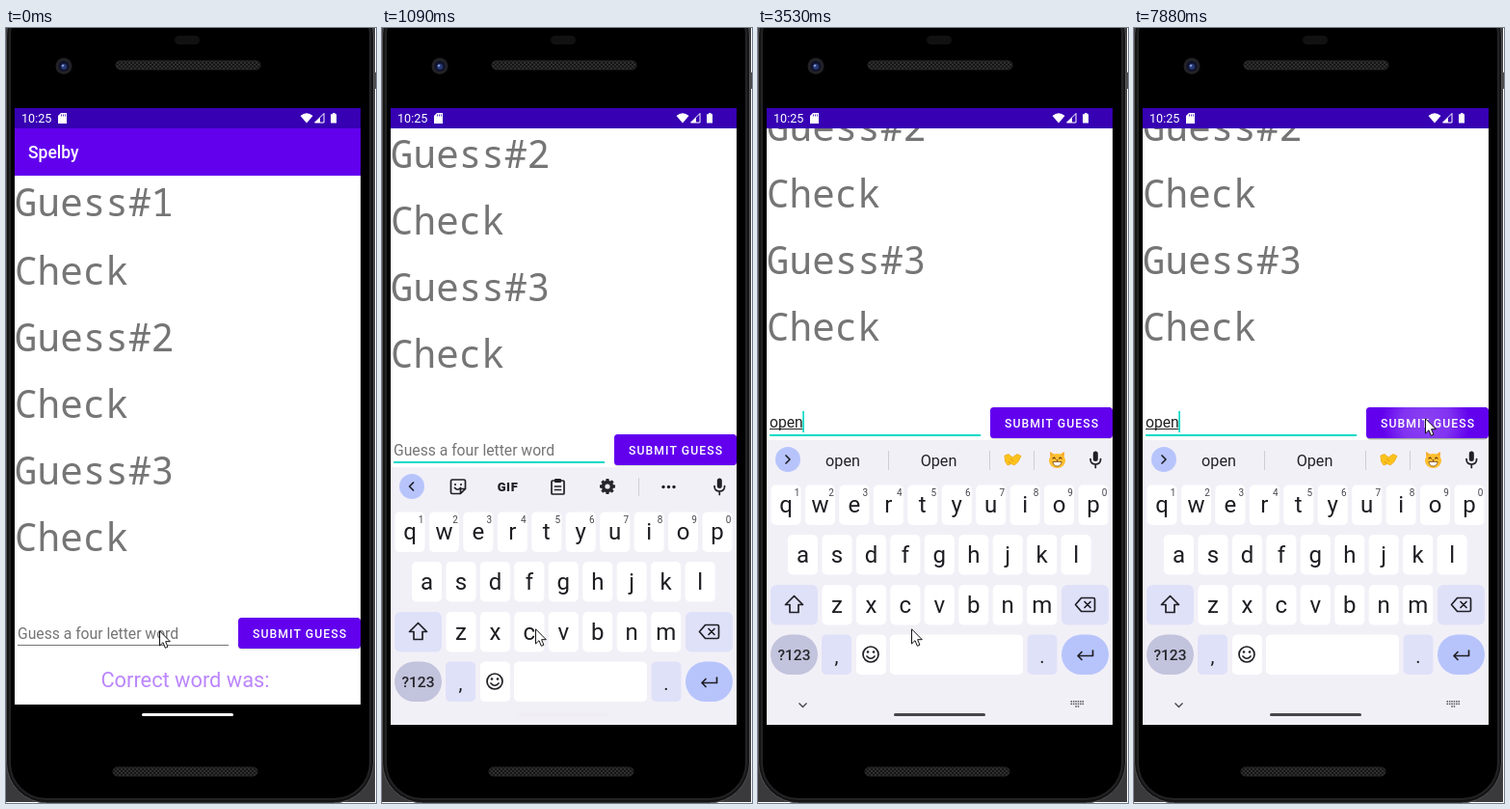
Write an HTML page that moves like this. It is 384 px wide and 803 px high and loops after 8 s.

```html
<!DOCTYPE html>
<html lang="en">
<head>
<meta charset="utf-8">
<title>Word game</title>
<style>
html, body { margin: 0; width: 100%; height: 100%; overflow: hidden; background: #fff; }
svg { display: block; width: 384px; height: 803px; font-family: Roboto, "Open Sans", sans-serif; }
text { white-space: pre; }
.mono { font: 39.3px "Noto Sans Mono", "DejaVu Sans Mono", monospace; fill: #757575; }
.line { fill: none; stroke: #1f1f25; stroke-width: 1.7; stroke-linecap: round; stroke-linejoin: round; }
.key { font-size: 24px; fill: #1d1d22; text-anchor: middle; }
.digit { font-size: 10px; fill: #45454d; text-anchor: middle; }
.word { font-size: 16.2px; fill: #222228; text-anchor: middle; }
</style>
</head>
<body>
<svg id="stage" viewBox="0 0 384 803" xmlns="http://www.w3.org/2000/svg"></svg>
<script>
const LOOP = 8000;

const rect = (x, y, w, h, fill, r = 0, more = '') =>
  `<rect x="${x}" y="${y}" width="${w}" height="${h}" rx="${r}" fill="${fill}" ${more}/>`;
const circle = (x, y, r, fill, more = '') => `<circle cx="${x}" cy="${y}" r="${r}" fill="${fill}" ${more}/>`;
const text = (x, y, s, more = '') => `<text x="${x}" y="${y}" ${more}>${s}</text>`;
const path = (d, more = 'class="line"') => `<path d="${d}" ${more}/>`;
const group = (id, body, more = '') => `<g id="${id}" ${more}>${body}</g>`;

function phone() {
  const grille = (x, y) => rect(x, y, 150, 9, '#151515', 4.5) + rect(x, y, 150, 9, 'url(#mesh)', 4.5, 'stroke="#262626" stroke-width="1"');
  return rect(0, 0, 383, 802, '#3a3a3c')
    + rect(379, 46, 5, 17, '#4a4a4c')
    + rect(0.5, -34, 381, 837, '#141415', 42, 'stroke="#505053" stroke-width="1"')
    + rect(4, -30, 374, 829, '#000', 38, 'stroke="#232325" stroke-width="2"')
    + rect(175, 8, 26, 9, '#111112', 4.5)
    + circle(60, 39.5, 8.5, '#222227') + circle(60, 39.5, 5.5, '#10142c')
    + circle(60, 40, 3, '#293b78') + circle(59, 39, 1.2, '#8798d4')
    + grille(114, 34) + grille(111, 766);
}

function statusBar() {
  return rect(9, 83, 359, 21, '#3700b3')
    + text(16, 98, '10:25', 'font-size="12.6" fill="#fff"')
    + path('M57 88h6v11h-9v-8z', 'fill="#fff"')
    + path('M57.500 89.500v2M59.500 89.500v2M61.500 89.500v2', 'stroke="#3700b3" stroke-width=".8"')
    + path('M305.500 91Q312 85.500 318.500 91L312 98.500z', 'fill="#fff"')
    + path('M320.500 98L330 88.500V98z', 'fill="none" stroke="#fff"')
    + path('M320.500 98L326 92.500V98z', 'fill="#fff"')
    + path('M339 88h2.500v1.200h1.500v9.300h-6v-9.300h2z', 'fill="#fff"');
}

function content() {
  const rows = [195, 266, 335, 404, 473, 542].map((y, i) =>
    text(9, y, i % 2 ? 'Check' : 'Guess#' + (i / 2 + 1), 'class="mono"')).join('');
  return rect(9, 104, 359, 597, '#fff')
    + rect(9, 104, 359, 49, '#6200ee')
    + text(23, 135, 'Spelby', 'font-size="17.5" font-weight="500" fill="#fff"')
    + rows
    + text(12, 632.5, 'Guess a four letter word', 'id="hint" font-size="15.700" fill="#757575"')
    + text(12, 632, '', 'id="typed" font-size="15.700" fill="#212121"')
    + rect(12, 633, 0, 1, '#212121', 0, 'id="composing"')
    + rect(12, 639, 219, 1, '#757575', 0, 'id="fieldLine"')
    + rect(12, 615, 1.7, 22, '#03dac5', 0, 'id="caret"')
    + rect(241.500, 612.500, 126, 32, '#000', 4, 'id="shade" opacity=".12"')
    + rect(241, 611, 127, 32, '#6200ee', 3.5)
    + rect(241, 611, 127, 32, 'url(#ripple)', 3.5, 'id="press"')
    + text(256, 631.5, 'SUBMIT GUESS', 'font-size="12.230" font-weight="500" letter-spacing="1.090" fill="#fff"')
    + text(186, 683, 'Correct word was:', 'font-size="21.8" text-anchor="middle" fill="#bb86fc"');
}

function icons() {
  let teeth = '';
  for (let a = 0; a < 360; a += 45) teeth += rect(232.3, 439, 3.4, 4, '#26262c', 0.8, `transform="rotate(${a} 234 447)"`);
  return path('M32.500 443L28.500 447L32.500 451')
    + path('M73 440h12q1.500 0 1.500 1.500v8l-5 5H73q-1.500 0-1.500-1.500v-11.500q0-1.500 1.500-1.500zM81.500 454v-4.500h5M75.500 448.500q3 3.500 6 0')
    + circle(76, 445, 1.1, '#1f1f25') + circle(82, 445, 1.1, '#1f1f25')
    + text(130.5, 452, 'GIF', 'font-size="13" font-weight="900" text-anchor="middle" fill="#1f1f25" letter-spacing=".6"')
    + path('M177 441h11q1 0 1 1v12q0 1-1 1h-11q-1 0-1-1v-12q0-1 1-1zM179.500 447h6M179.500 450.500h6')
    + rect(179, 439, 7, 4, '#1f1f25', 1)
    + teeth + circle(234, 447, 4.4, 'none', 'stroke="#26262c" stroke-width="3.600"')
    + rect(266, 438, 1, 19, '#d0ced6')
    + [292, 297.5, 303].map(x => circle(x, 447.5, 1.7, '#1f1f25')).join('');
}

function suggestions() {
  const ink = 'fill="none" stroke="#6a3b12" stroke-width="1.200" stroke-linecap="round"';
  const hands = path('M256 443l4-1.500 4 3.500 5-3.500 4 2-3 6-4 3.500-3-1.500-4 1.500-2.500-4z', 'fill="#fcc21b" stroke="#eeac16" stroke-width=".8"')
    + path('M262 446l3 3M260 449l2 2', 'stroke="#e09a12"');
  const cat = path('M303.500 447l-.5-8 5.500 3.500zM317.500 447l.5-8-5.500 3.500z', 'fill="#f9a825"')
    + `<ellipse cx="310.500" cy="448.500" rx="8.500" ry="7.500" fill="#fdbf2d"/>`
    + path('M306 449.500h9q-.5 4.500-4.500 4.500t-4.500-4.500z', 'fill="#fff" stroke="#7a4a1c" stroke-width=".8"')
    + path('M306 446q1.200-1.800 2.400 0M312.600 446q1.200-1.800 2.400 0', ink)
    + circle(310.500, 448, 0.9, '#8a4b38');
  return path('M29 443L33 447L29 451')
    + rect(135, 438, 1, 20, '#cfcdd5') + rect(240, 438, 1, 20, '#cfcdd5')
    + [88, 187.5, 287].map((x, i) => text(x, 454, '', `class="word" id="word${i}"`)).join('')
    + group('emoji', rect(286, 438, 1, 20, '#cfcdd5') + hands + cat);
}

function keyboard() {
  const row = (keys, x0, y) => [...keys].map((k, i) => {
    const x = x0 + i * 35.45;
    return rect(x - 15.5, y, 31, 41.5, '#fff', 5) + text(x, y + 28.5, k, 'class="key"')
      + (keys.length > 9 ? text(x + 11.5, y + 11, (i + 1) % 10, 'class="digit"') : '');
  }).join('');
  const dots = [0, 1, 2].map(j => [0, 1, 2, 3, 4, 5].map(i =>
    j === 2 && (i < 2 || i > 3) ? '' : rect(324.500 + i * 2.4, 697 + j * 2.6, 1.5, 1.5, '#55555d')).join('')).join('');
  return rect(9, 427, 359, 310, '#f2f0f7')
    + circle(31, 447, 13, '#b7c4fc')
    + group('icons', icons()) + group('strip', suggestions())
    + rect(347.8, 438.500, 5, 10.500, '#1f1f25', 2.5)
    + path('M345 446.500q0 5.500 5.300 5.500t5.300-5.500M350.300 452v3.500')
    + row('qwertyuiop', 29, 473.5) + row('asdfghjkl', 46.5, 525) + row('zxcvbnm', 82, 577)
    + rect(13, 577, 49, 41.5, '#dfe1f8', 6) + rect(315, 577, 49, 41.5, '#dfe1f8', 6)
    + path('M37.500 588.500l9 9h-4.500v8h-9v-8h-4.500z')
    + path('M335.500 590.500h12.500q1.500 0 1.500 1.500v11q0 1.500-1.500 1.500H335.500l-6-7zM339 594.500l6 6M345 594.500l-6 6')
    + rect(13, 628.5, 49, 41.5, '#c2c3dc', 20.7)
    + text(37.5, 655, '?123', 'font-size="15.500" font-weight="500" text-anchor="middle" fill="#25252c"')
    + rect(66, 628.5, 31, 41.5, '#dfe1f8', 5) + text(81.5, 658, ',', 'class="key" style="font-size:20px"')
    + rect(102, 628.5, 31, 41.5, '#fff', 5) + circle(117, 649, 8, 'none', 'stroke="#1f1f25" stroke-width="1.700"')
    + circle(114, 646.5, 1.3, '#1f1f25') + circle(120, 646.5, 1.3, '#1f1f25') + path('M113 651q4 4.500 8 0')
    + rect(137, 628.5, 138, 41.5, '#fff', 5)
    + rect(279.5, 628.5, 31, 41.5, '#dfe1f8', 5) + text(295, 658, '.', 'class="key" style="font-size:20px"')
    + rect(315, 628.5, 49, 41.5, '#b7c4fc', 20.7)
    + path('M347.500 645v5.500h-15M336 646.500l-4 4 4 4')
    + path('M42.500 699.500l4 4 4-4', 'fill="none" stroke="#44444c" stroke-width="1.300"') + dots;
}

const defs = `<defs>
  <pattern id="mesh" width="4" height="4" patternUnits="userSpaceOnUse"><path d="M0 0L4 4M4 0L0 4" stroke="#363636" stroke-width=".8"/></pattern>
  <radialGradient id="ripple" gradientUnits="userSpaceOnUse" cx="303" cy="626" r="46">
    <stop offset="0" stop-color="#fff" stop-opacity=".26"/><stop offset=".55" stop-color="#fff" stop-opacity=".2"/>
    <stop offset="1" stop-color="#fff" stop-opacity="0"/></radialGradient>
  <clipPath id="screen"><rect x="9" y="104" width="359" height="618"/></clipPath>
</defs>`;

document.getElementById('stage').innerHTML = defs + phone()
  + group('view', rect(9, 104, 359, 618, '#000') + group('content', content()) + group('keyboard', keyboard()), 'clip-path="url(#screen)"')
  + statusBar()
  + rect(141, 710, 95, 3, '#fff', 1.5, 'id="home"')
  + path('M47 418.500L53.500 424A8.700 8.700 0 1 1 40.500 424z', 'id="drop" fill="#03dac5"')
  + path('M0.500 .8V16L4 12.700 6.300 18.300 8.900 17.200 6.600 11.700H11.300z', 'id="pointer" fill="#fff" stroke="#111" stroke-width="1"');

const el = {};
document.querySelectorAll('#stage [id]').forEach(n => el[n.id] = n);

const start = {
  pointer: [159, 624], focus: false, pan: 0, kb: null, caret: false, typed: '',
  words: null, emoji: false, home: '#fff', drop: false, shade: 0.12, press: false
};

// Each step holds until the next one.
const steps = [
  [250, { pointer: [159, 622] }],
  [400, { focus: true }],
  [970, { pan: -25 }],
  [1090, { pan: -190, kb: 28, home: '#efedf3' }],
  [1240, { pan: -218, kb: 0, home: '#e0dee5' }],
  [1390, { caret: true, home: '#cfcdd4' }],
  [1640, { home: '#b3b1b8' }],
  [1910, { caret: false, home: '#949299' }],
  [2190, { home: '#77757c' }],
  [2320, { caret: true, home: '#605e65' }],
  [2590, { home: '#48464d' }],
  [2740, { typed: 'o' }],
  [2860, { typed: 'op' }],
  [2990, { words: ['op', 'open', 'opinion'] }],
  [3140, { typed: 'ope' }],
  [3260, { words: ['ope', 'open', 'opening'] }],
  [3380, { typed: 'open' }],
  [3530, { words: ['open', 'Open', ''], emoji: true }],
  [3900, { caret: false }],
  [4050, { pointer: [244, 546] }],
  [4200, { pointer: [308, 470] }],
  [4320, { pointer: [330, 430] }],
  [4440, { pointer: [325, 417], caret: true }],
  [4590, { pointer: [309, 401] }],
  [5420, { caret: false }],
  [5570, { drop: true }],
  [5860, { caret: true }],
  [6320, { pointer: [306, 402] }],
  [6440, { pointer: [305, 403], caret: false }],
  [6560, { pointer: [303, 404] }],
  [6680, { pointer: [302, 404] }],
  [6980, { caret: true, shade: 0.25 }],
  [7100, { shade: 0.34 }],
  [7880, { drop: false, press: true }]
];

const set = (node, attrs) => { for (const k in attrs) node.setAttribute(k, attrs[k]); };
const show = (node, on) => set(node, { visibility: on ? 'inherit' : 'hidden' });
const move = (node, x, y) => set(node, { transform: `translate(${x} ${y})` });

function draw(t) {
  const s = { ...start };
  for (const [at, change] of steps) if (at <= t) Object.assign(s, change);

  move(el.pointer, ...s.pointer);
  move(el.content, 0, s.pan);
  show(el.keyboard, s.kb !== null);
  move(el.keyboard, 0, s.kb || 0);
  set(el.home, { fill: s.home });
  set(el.fieldLine, s.focus
    ? { height: 2, fill: '#03dac5' }
    : { height: 1, fill: '#757575' });

  show(el.hint, !s.typed);
  el.typed.textContent = s.typed;
  const width = s.typed ? el.typed.getComputedTextLength() : 0;
  set(el.composing, { width });
  set(el.caret, { x: 12 + width - (s.typed ? 0.5 : 0) });
  show(el.caret, s.caret);
  show(el.drop, s.drop);

  show(el.icons, !s.words);
  show(el.strip, s.words);
  [0, 1, 2].forEach(i => el['word' + i].textContent = s.words ? s.words[i] : '');
  show(el.emoji, s.emoji);
  set(el.shade, { opacity: s.shade });
  show(el.press, s.press);
}

const begin = performance.now();
function tick() {
  draw((performance.now() - begin) % LOOP);
  requestAnimationFrame(tick);
}
tick();
</script>
</body>
</html>
```
